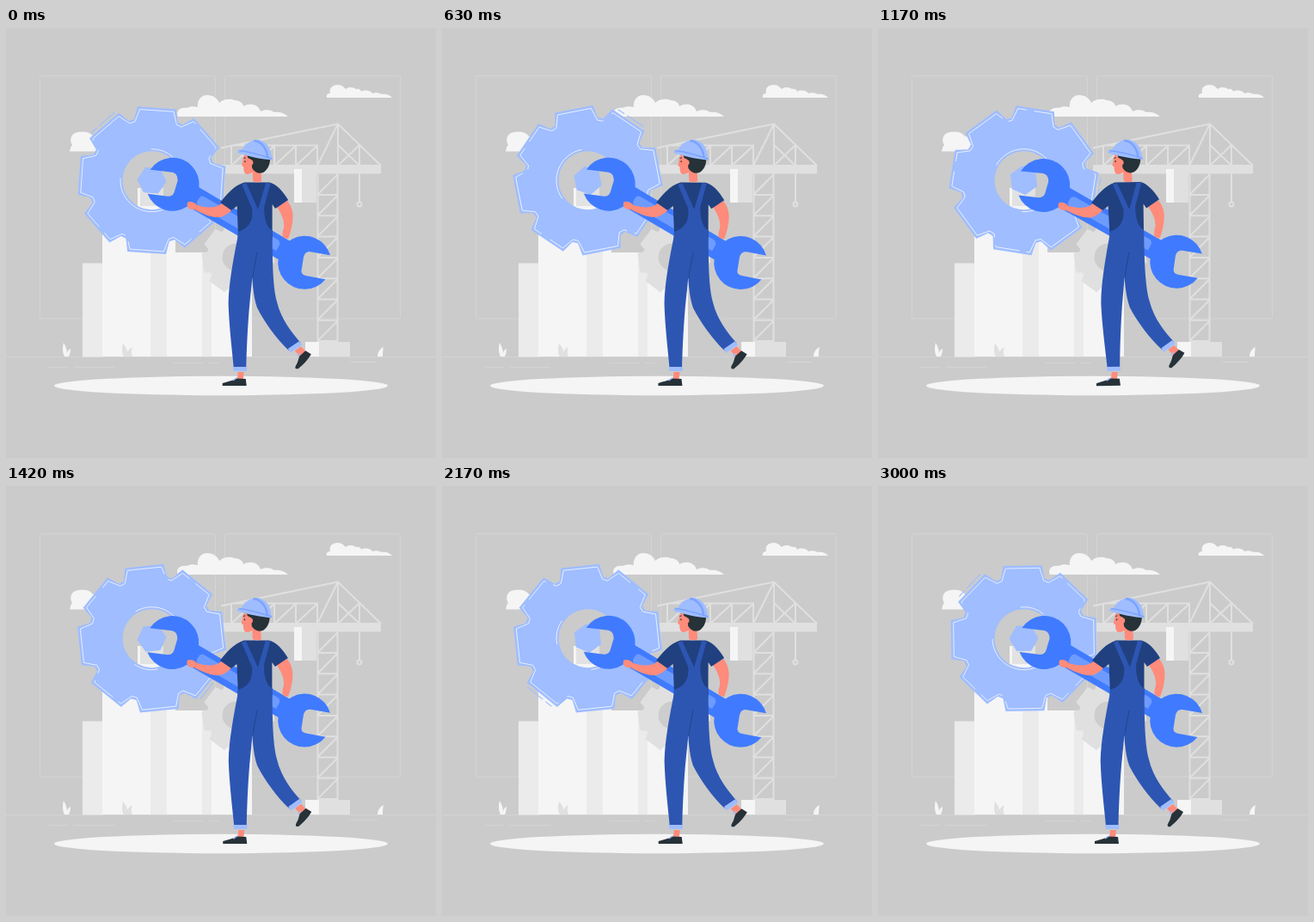
An HTML page that plays this animation: 500x500 px, repeating every 3040 ms.

```html
<!DOCTYPE html>
<html lang="en">
<head>
<meta charset="utf-8">
<title>Worker turning a gear</title>
<style>
  html, body { margin: 0; width: 100%; height: 100%; overflow: hidden; background: #cbcbcb; }
  svg { display: block; width: 100%; height: 100%; }
  .white { fill: #f5f5f5; }
  .pale { fill: #ebebeb; }
  .grey { fill: #e0e0e0; }
  .blue { fill: #407bff; }
  .light { fill: #9fbdff; }
  .denim { fill: #2d56b3; }
  .navy { fill: #204080; }
  .skin { fill: #ff8b7b; }
  .ink { fill: #263238; }
  .line { fill: none; stroke: #e0e0e0; stroke-width: 2; }
  .faint { fill: none; stroke: #d4d4d4; stroke-width: 1; }
  .chalk { fill: none; stroke: #f5f8ff; stroke-width: .8; }
</style>
</head>
<body>
<svg viewBox="0 0 500 500">
  <rect width="500" height="500" fill="#cbcbcb"/>

  <g class="faint">
    <rect x="39.500" y="55.500" width="204" height="282.500" rx="2"/>
    <rect x="254.500" y="55.500" width="204" height="282.500" rx="2"/>
    <path d="M0 382.500H500M50 394.500H72M79 394.500H126M195 389.500H229M236 389.500H247M400 388.500H432"/>
  </g>

  <g class="white">
    <path d="M200 103C197 97 202 92 210 93C214 91 219 91 223 92C222 84 227 78 234 78C241 78 246 82 248 87C253 82 261 82 266 84C272 84 276 88 276 91C283 87 293 88 296 97C302 94 308 95 312 98C318 97 324 99 328 103Z"/>
    <path d="M373 81C372 78 374 76 377 76C375 69 381 66 386 66C390 66 393 69 395 71C399 68 404 69 407 71C410 70 413 72 413 74C418 71 424 73 426 76C431 74 435 76 437 77C442 76 446 78 449 81Z"/>
    <path d="M74 143.500C75 140 75 138 77 136C73 130 76 121 85 121C92 120 98 121 101 126C111 126 116 134 119 143.500Z"/>
  </g>

  <rect class="pale" x="89" y="273.500" width="24" height="109"/>
  <rect class="white" x="112" y="207" width="56" height="175"/>
  <path class="white" d="M153 186H156V207H153Z"/>
  <rect x="156" y="186" width="27" height="21" fill="#e2e2e2"/>
  <rect class="pale" x="168" y="207" width="20" height="175"/>
  <path class="white" d="M187 207H197V261H228V382H187ZM168 207H187V212H168Z"/>
  <rect class="pale" x="228" y="261" width="11" height="121"/>
  <rect class="white" x="239" y="261" width="47" height="121"/>

  <g transform="translate(270 267.500) rotate(-8) scale(.49)"><path id="backGear" class="grey"/></g>
  <circle cx="267.500" cy="266.500" r="16" fill="#cdcdcd"/>

  <path id="crane" class="line"/>
  <rect class="grey" x="250" y="159" width="186" height="10.500" rx="1"/>
  <rect class="grey" x="335" y="164" width="26" height="39"/>
  <rect class="white" x="335" y="164" width="9" height="39"/>
  <rect class="grey" x="348" y="365" width="52" height="17"/>
  <rect class="white" x="348" y="365" width="16" height="17"/>

  <path class="white" d="M68 382C65 376 66 370 67 366C70 371 71 375 71 378C72 375 73 374 75 373C75 377 74 380 73 382ZM432 382C432 377 435 373 439 371C438 375 438 379 438 382Z"/>
  <path class="grey" d="M137 382C134 377 135 371 136 367C140 371 141 374 141 377C143 373 145 372 147 371C145 376 146 379 147 382Z"/>
  <ellipse class="white" cx="250" cy="416" rx="194" ry="11.200"/>

  <g id="gear">
    <path id="gearBody" class="light" fill-rule="evenodd"/>
    <path id="gearInset" class="chalk" stroke-dasharray="96 8 30 9 120 12"/>
    <path id="arcs" class="chalk"/>
    <path transform="rotate(-45)" d="M-17 -88H-8M-4 -88H19" fill="none" stroke="#9fbdff" stroke-width="1.200"/>
    <path id="nut" class="light"/>
  </g>

  <g id="worker">
    <g class="blue">
      <path d="M167.500 165A31 31 0 1 1 164.500 193L188 196Q194 196 195.500 191L199.500 177.500Q199.500 169 193 168Z"/>
      <path d="M377 264A31 31 0 1 0 371.500 292L350 288Q343 287 343.500 282L346 266Q348 259 354 260Z"/>
      <path d="M217 181L334 250L320 271L205 204Z"/>
    </g>
    <path d="M230 196L316 246Q320 249 317 254L314 259L224 207Q220 205 223 200L225 197Q227 195 230 196Z" fill="#6e9bff"/>

    <path class="skin" d="M314 207C320 215 324 224 323 232C321 238 321 242 323 244L328 245C331 238 333.500 228 333.500 218C333 211 331 206 327 201Z"/>

    <path class="skin" d="M270 400H277L276 410L269 409ZM336 375L343 370L349 376L342 382Z"/>
    <path class="ink" d="M252 413C258 411 264 410 268 407.500L279 408L280 416H252ZM348.500 375L355 379C352 385 345 392 340 396C336 397 336 394 338 391C341 386 340 382 343 380Z"/>
    <path d="M264 410L269 406.500M339 382L342 378" fill="none" stroke="#9fbdff" stroke-width="1.500"/>

    <path class="denim" d="M309.500 236C310 262 309.500 298 315 318C320 339 333 355 343 366L329 375C315 362 300 341 292 325C287 310 286 290 286 275L288 242Z"/>
    <path class="denim" d="M270 240C264.500 268 259 297 258.700 320C259.500 346 263 374 265 395H279.500C280 374 281 350 283 325L287 284L305 242Z"/>
    <path d="M292 261C290 272 288 281 286.500 291" fill="none" stroke="#204080" stroke-width=".8"/>
    <path class="light" d="M264 394H280.500L280 399H265ZM328 373L341 364L344.500 368L331 377.500Z"/>

    <path class="skin" d="M253 202C246 208 240 211 222 206C219 202 213 201 211 203C209 208 213 212 219 211C230 217 241 221 249 220C256 218 260 214 264 210Z"/>
    <path class="navy" d="M277 179.500H306C314 181 322 190 328 200L313 210L309.500 205V243H270L268.500 207L262 212L249 203C256 194 265 183 277 179.500Z"/>
    <path class="denim" d="M274 182L279 180L293 211L302 180L307.500 180.500L300 208C300 224 304 233 309.500 235V246H269.500V237C281 234 288 225 286 210Z"/>

    <path class="skin" d="M278 145C275 151 275.500 155 274 159.500Q274 161 276 161C276 166 277 170 280 170C283 170 285 169 286.500 168L287 178Q292 181 297 178L296 164L300 148Z"/>
    <path class="ink" d="M280 146L307 150C307 158 305 164 299 168C294 170 289 168 286 163L285 153L281 151Z"/>
    <circle class="skin" cx="284" cy="156.500" r="3.200"/>
    <ellipse class="ink" cx="277.700" cy="155.300" rx=".7" ry="1.100"/>
    <path d="M276 151.500L278.500 150.800" stroke="#263238" stroke-width=".9"/>
    <path class="light" d="M274 142C277 134 286 129.500 294 130C302 132 308 139 308.500 149L310.500 153.500C297 152.500 282 149.500 269.500 145.500Q268 142.500 272 141.500Z"/>
    <path d="M288 131C297 132 303 140 304 150" fill="none" stroke="#7ba3ff" stroke-width="2.500"/>
    <path d="M271 142.500C283 144 297 148 309 152" fill="none" stroke="#7ba3ff" stroke-width="1.500"/>
  </g>
</svg>
<script>
  const $ = id => document.getElementById(id);
  const polar = (r, deg) => {
    const a = deg * Math.PI / 180;
    return [r * Math.cos(a), r * Math.sin(a)];
  };
  const text = p => p.map(v => v.toFixed(2)).join(' ');
  const polygon = points => 'M' + points.map(text).join('L') + 'Z';
  const ring = r => `M${r} 0A${r} ${r} 0 1 0 ${-r} 0A${r} ${r} 0 1 0 ${r} 0Z`;
  const arc = (r, from, to) => `M${text(polar(r, from))}A${r} ${r} 0 0 1 ${text(polar(r, to))}`;

  function gearOutline(top, halfWidth, valley) {
    const points = [];
    const r = Math.hypot(top, halfWidth);
    const spread = Math.atan2(halfWidth, top) * 180 / Math.PI;
    for (let a = -90; a < 270; a += 45) {
      points.push(polar(valley, a - 20), polar(r, a - spread), polar(r, a + spread), polar(valley, a + 20));
    }
    return polygon(points);
  }

  function cranePath() {
    let d = 'M250 139.500L386 111.500L436 160M262 136.500H362V160M386 111.500L362 160M386 111.500V160' +
      'M411 136V160M386 136L411 160M386 160L411 136M411 169V202' +
      'M408.500 205a2.500 2.500 0 1 0 5 0a2.500 2.500 0 1 0 -5 0' +
      'M362.500 169V366M385.500 169V366';
    for (let x = 262; x < 350; x += 25) d += `M${x} 136V160L${x + 25} 137`;
    for (let y = 170; y < 350; y += 24.3) d += `M362 ${y + 24}H386M362 ${y + 24}L386 ${y}`;
    return d;
  }

  const outline = gearOutline(84.5, 22.5, 74);
  $('gearBody').setAttribute('d', outline + ring(34));
  $('backGear').setAttribute('d', outline);
  $('gearInset').setAttribute('d', gearOutline(81.5, 19.8, 71));
  $('arcs').setAttribute('d', arc(36.5, 65, 180) + arc(36.5, 265, 310));
  $('nut').setAttribute('d', polygon([0, 60, 120, 180, 240, 300].map(a => polar(17, a))));
  $('crane').setAttribute('d', cranePath());

  const LOOP = 3040, STEP = 1000 / 24;

  // Sway in degrees: up to 1 at a quarter, down to -1 at three quarters, linear between.
  const sway = p => p < .25 ? p * 4 : p < .75 ? 2 - p * 4 : p * 4 - 4;

  function draw(ms) {
    const tick = Math.min(72, Math.floor((ms % LOOP + 5) / STEP) + 1);
    $('gear').setAttribute('transform', `translate(169.500 177.200) rotate(${tick * 5 - 1})`);
    $('worker').setAttribute('transform', `rotate(${sway(tick / 36 % 1)} 270.5 272.5)`);
  }

  const start = performance.now();
  function loop() {
    draw(performance.now() - start);
    requestAnimationFrame(loop);
  }
  loop();
</script>
</body>
</html>
```
